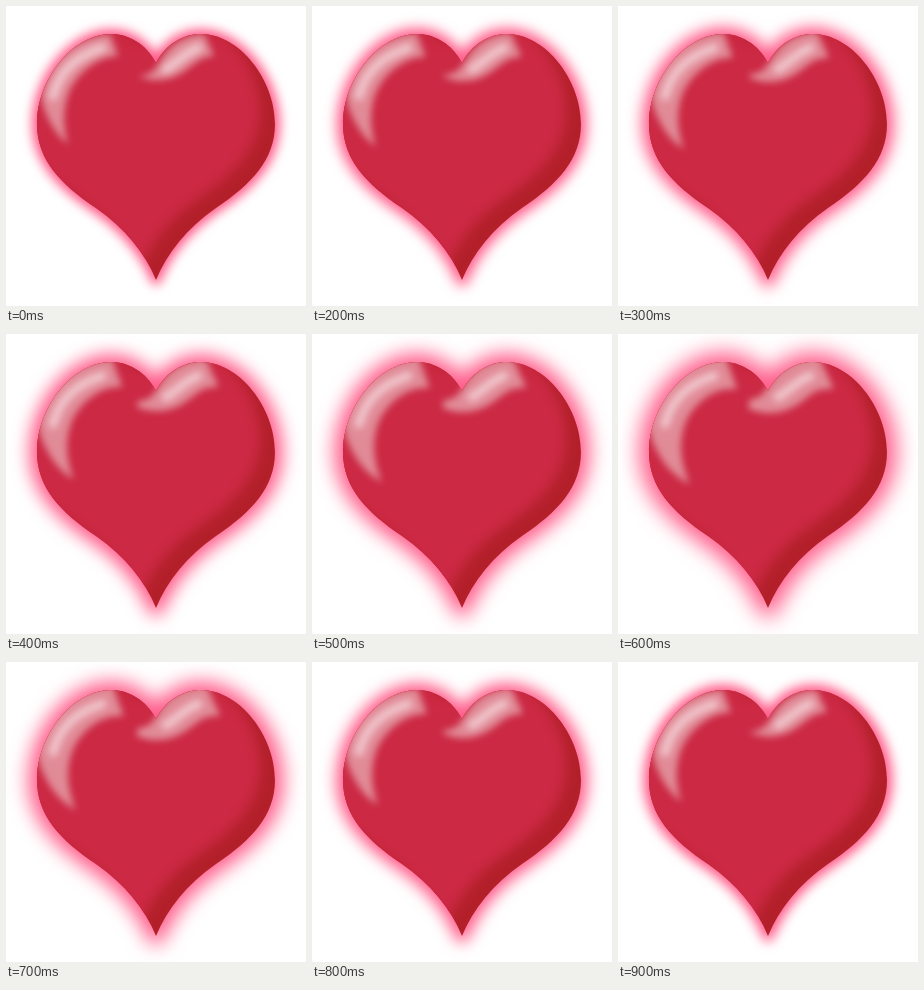
Write an HTML page that moves like this. It is 300 by 300 pixels and loops after 1 s.

```html
<!DOCTYPE html>
<html lang="en">
<head>
<meta charset="utf-8">
<title>Glowing heart</title>
<style>
  html, body { margin: 0; width: 100%; height: 100%; overflow: hidden; background: #fff; }
  svg { display: block; width: 300px; height: 300px; }
</style>
</head>
<body>
<svg viewBox="0 0 300 300">
  <defs>
    <path id="heart" d="M150 57C140 38 123 28 105 28C67 28 31 73 31 118C31 153 54 178 90 202
      C119 222 139 247 150 274C161 247 181 222 210 202C246 178 269 153 269 118
      C269 73 233 28 195 28C177 28 160 38 150 57Z"/>
    <clipPath id="inside"><use href="#heart"/></clipPath>
    <filter id="halo" filterUnits="userSpaceOnUse" x="-60" y="-60" width="420" height="420" color-interpolation-filters="sRGB">
      <feGaussianBlur id="blur" stdDeviation="6"/>
    </filter>
    <filter id="soft" filterUnits="userSpaceOnUse" x="-60" y="-60" width="420" height="420" color-interpolation-filters="sRGB">
      <feGaussianBlur stdDeviation="6"/>
    </filter>
    <filter id="shine" filterUnits="userSpaceOnUse" x="0" y="0" width="300" height="300" color-interpolation-filters="sRGB">
      <feGaussianBlur stdDeviation="3.5"/>
    </filter>
  </defs>

  <use id="glow" href="#heart" fill="#ff5c8a" stroke="#ff5c8a" stroke-linejoin="round" filter="url(#halo)"/>
  <use href="#heart" fill="#b3202a"/>
  <g clip-path="url(#inside)">
    <g filter="url(#soft)"><use href="#heart" x="-18" y="-13" fill="#cc2944" stroke="#cc2944" stroke-width="6"/></g>
    <g filter="url(#shine)">
      <g id="sheen" fill="#f3dcdc" stroke="#f3dcdc">
        <path opacity=".55" d="M104 28L112 50C94 50 74 64 64 84C57 100 56 118 62 138C46 126 35 100 35 88C42 56 68 30 104 28Z"/>
        <path opacity=".55" d="M198 28L208 50C192 50 186 62 172 69C158 76 144 75 132 70C142 70 148 66 153 57C162 40 176 29 198 28Z"/>
      </g>
      <g fill="none" stroke="#fff" stroke-width="9" stroke-linecap="round" opacity=".5">
        <path d="M47 90C53 66 70 50 96 42"/>
        <path d="M160 63C170 58 178 47 192 42"/>
      </g>
    </g>
  </g>
</svg>
<script>
  const glow = document.getElementById('glow');
  const blur = document.getElementById('blur');
  const sheen = document.getElementById('sheen');
  // Glow strength for each 100 ms step of the one-second loop
  const levels = [0, 0, 1, 2, 3, 4, 5, 4, 2, 0.6];

  function draw(now) {
    const level = levels[Math.floor(now % 1000 / 100)];
    blur.setAttribute('stdDeviation', 5.4 + level);
    glow.setAttribute('stroke-width', 10 + level * 1.8);
    sheen.setAttribute('stroke-width', level * 2);
    requestAnimationFrame(draw);
  }
  draw(performance.now());
</script>
</body>
</html>
```
